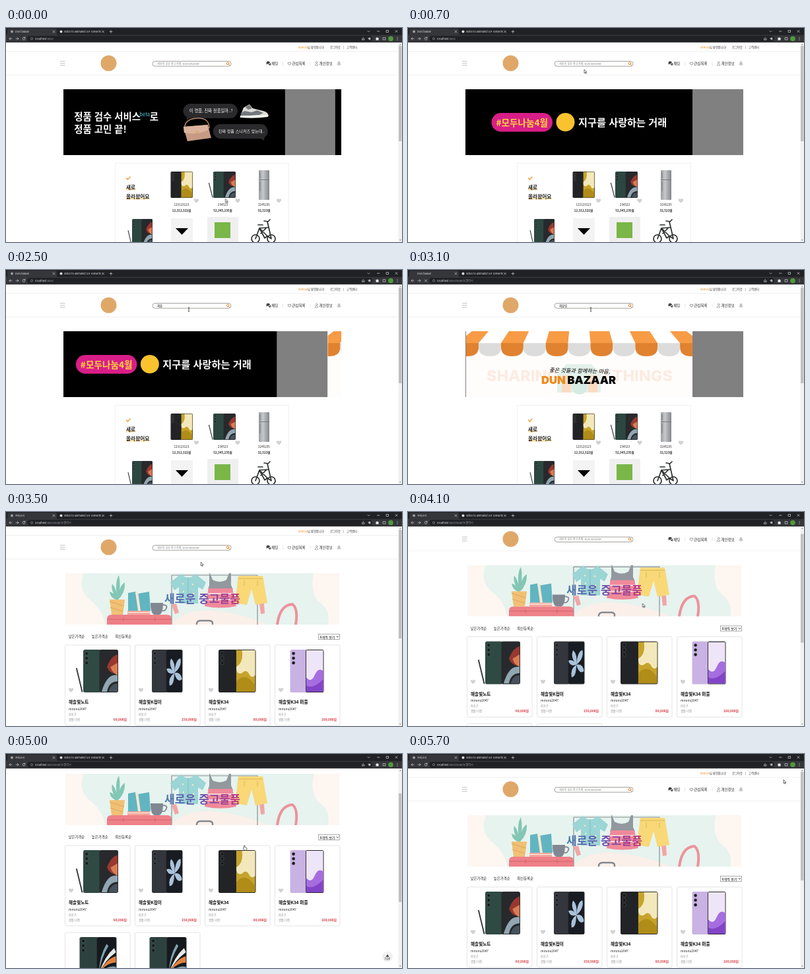
These frames come from a looping animation (600x325 px, 5.8 s). An HTML page:

```html
<!DOCTYPE html>
<html lang="ko">
<head>
<meta charset="utf-8">
<title>Market demo</title>
<style>
  html, body { margin: 0; width: 100%; height: 100%; overflow: hidden; background: #fff; }
  svg { display: block; font-family: "Noto Sans CJK KR", "Noto Sans CJK", sans-serif; }
  .b { font-weight: 700; }
  .m { text-anchor: middle; }
  .e { text-anchor: end; }
  .line { fill: none; stroke-linecap: round; stroke-linejoin: round; }
  .track, .scroll, #cursor { animation: 5800ms linear infinite paused; }
  .track { animation-name: slide; animation-delay: -17ms; }
  .scroll { --k: -1px; animation-name: scroll; }
  .thumb { --k: .52px; }
  #cursor { animation-name: move; }
  @keyframes slide {
    0% { transform: translateX(0); animation-timing-function: ease; }
    8.62%, 42.83% { transform: translateX(-420px); animation-timing-function: ease; }
    51.45%, 100% { transform: translateX(-840px); }
  }
  @keyframes scroll {
    0%, 68.62% { transform: translateY(0); animation-timing-function: ease-in-out; }
    73.28%, 76.72% { transform: translateY(calc(31 * var(--k))); animation-timing-function: ease-in-out; }
    80.17%, 87.93% { transform: translateY(calc(63 * var(--k))); animation-timing-function: ease-in-out; }
    94.83%, 100% { transform: translateY(0); }
  }
  @keyframes move {
    0% { transform: translate(332.5px, 259.5px); animation-timing-function: ease-in-out; }
    10.34%, 12.07% { transform: translate(267px, 63px); }
    15.52% { transform: translate(273px, 58px); }
    18.97%, 56.03% { transform: translate(277px, 57px); animation-timing-function: ease-in-out; }
    68.97%, 75.86% { transform: translate(355.5px, 139px); }
    81%, 88.79% { transform: translate(361px, 139px); animation-timing-function: ease-in-out; }
    98%, 100% { transform: translate(569px, 39px); }
  }
</style>
</head>
<body>
<svg width="600" height="325">
  <defs>
    <clipPath id="view"><rect y="22" width="600" height="303"/></clipPath>
    <clipPath id="hero"><rect x="87.5" y="93" width="420" height="100"/></clipPath>
    <clipPath id="awningClip"><path d="M88 131V100L97 93H422L431 100V131Z"/></clipPath>
    <clipPath id="artClip"><rect x="90" y="93" width="415" height="78"/></clipPath>
    <linearGradient id="titleInk"><stop stop-color="#4c7fae"/><stop offset=".5" stop-color="#6d52ad"/><stop offset="1" stop-color="#c2357f"/></linearGradient>
    <linearGradient id="steel"><stop stop-color="#9b9ea1"/><stop offset=".4" stop-color="#c6c8ca"/><stop offset="1" stop-color="#85888b"/></linearGradient>
    <path id="heart" d="M0 3.6C-6-.2-3.6-4.6 0-2C3.6-4.6 6-.2 0 3.6Z"/>

    <!-- phone wallpapers -->
    <symbol id="gold" viewBox="0 0 10 20" preserveAspectRatio="none">
      <path d="M0 0H10V20H0z" fill="#c6a32a"/><path d="M3 0H10V12Q8 14 6.500 11Q5 9 3 11Q0 12 0 8Q4 6 3 0z" fill="#f3e8bb"/><path d="M0 15Q5 10 10 17V20H0z" fill="#b08c18"/>
    </symbol>
    <symbol id="vivid" viewBox="0 0 10 20" preserveAspectRatio="none">
      <path d="M0 0H10V20H0z" fill="#27292c"/><path d="M10 2V11Q6 12 4 8Q6 3 10 2z" fill="#98382f"/><path d="M10 6V12Q7 11 6 8z" fill="#d97d56"/><path d="M1 20Q4 11 10 12V15Q5 15 4 20z" fill="#91a6b1"/><path d="M5 20Q6 16 10 16V20z" fill="#46535d"/>
    </symbol>
    <symbol id="ice" viewBox="0 0 10 20" preserveAspectRatio="none">
      <path d="M0 0H10V20H0z" fill="#181c22"/><path d="M5 11Q1 7 3 4Q6 6 5 11Q6 4 9 4Q10 8 5 11Q9 10 10 14Q7 16 5 11Q5 17 2 17Q1 13 5 11Q1 12 0 9Q3 8 5 11z" fill="#a9c2da"/>
    </symbol>
    <symbol id="lilac" viewBox="0 0 10 20" preserveAspectRatio="none">
      <path d="M0 0H10V20H0z" fill="#eee5f8"/><path d="M0 13Q3 16 5 12T10 10V20H0z" fill="#a56de0"/><path d="M0 17Q4 19 10 14V20H0z" fill="#8344c8"/>
    </symbol>
    <symbol id="swirl" viewBox="0 0 10 20" preserveAspectRatio="none">
      <path d="M0 0H10V20H0z" fill="#15191d"/><path d="M1 17Q4 9 9 5L10 7Q4 11 1 17z" fill="#e6ebe9"/><path d="M1 17Q5 10 10 9V12Q5 12 1 17z" fill="#e08340"/><path d="M1 17Q6 13 10 14V16Q5 14 1 17zM1 17Q1 9 5 3L6 4Q2 10 1 17z" fill="#7da1b1"/>
    </symbol>
  </defs>

  <g clip-path="url(#view)">
    <g class="scroll">
      <!-- header -->
      <g font-size="4.35" fill="#333">
        <text x="443" y="31.4" font-size="4" fill="#f08a1d">demo42</text>
        <text x="457" y="31.4" font-size="4.2">님 환영합니다!</text>
        <text x="491" y="31.4">로그아웃</text><text x="511" y="31.2">|</text><text x="516" y="31.4">고객센터</text>
      </g>
      <path d="M0 35.5H595M0 71.5H595" stroke="#f0f0f0"/>
      <path d="M82 50.5H89.5M82 53.5H89.5M82 56.5H89.5" stroke="#aaa" stroke-width=".7"/>
      <circle cx="155.5" cy="53.5" r="12" fill="#dfa869"/>
      <rect x="222" y="50.5" width="119" height="7.6" rx="3.8" fill="#fff" stroke="#8f8983" stroke-width=".8"/>
      <g class="line" stroke="#e08a2c"><circle cx="336" cy="53.8" r="1.8"/><path d="M337.4 55.2L339 56.8"/></g>
      <text data-on="0 2100 3200 5800" x="229" y="55.9" font-size="4.1" fill="#7c8585">세상의 모든 중고거래, DUN BAZAAR</text>
      <text id="typed" data-on="2100 3200" x="229" y="56" font-size="4.3" fill="#111"></text>
      <path data-on="1300 1800" d="M228.5 51V57" stroke="#222" stroke-width=".7"/>
      <g font-size="5.5" font-weight="500" fill="#222">
        <path d="M394.5 52.5a2.6 2 0 1 1 2 2l-1.8 1zM397.5 55.2q3 0 2.8-2.5q2 2 .4 3.3l.5 1.2l-1.4-.6q-1.800 .2-2.300-1.400z" fill="#444"/>
        <text x="402.2" y="56.2">채팅</text><text x="433.3" y="56.2">관심목록</text><text x="474.5" y="56.2">개인정보</text>
        <path d="M419.5 51V57M461 51V57" stroke="#ddd" stroke-width=".7"/>
        <use href="#heart" transform="translate(429.5 54) scale(.65)" fill="none" stroke="#555"/>
        <g class="line" stroke="#666" stroke-width=".5"><circle cx="470.5" cy="52.3" r="1.4"/><path d="M468.2 56.7q0-2.2 2.3-2.2t2.3 2.2z"/></g>
        <path d="M501 56.3q1.5-1.2 1.5-3.5q.2-2 2-2.2q1.8.2 2 2.2q0 2.3 1.5 3.5zM503.4 56.8h2.2q-1.1 1.4-2.2 0z" fill="#c4c4c4"/>
      </g>

      <!-- home -->
      <g data-on="0 3200">
        <g clip-path="url(#hero)"><g class="track">
          <g>
            <rect x="87" y="93" width="344.5" height="100"/>
            <g class="b" font-size="14.4" fill="#fff">
              <text x="111.5" y="140">정품 검수 서비스</text><text x="226" y="140">로</text><text x="111.5" y="159">정품 고민 끝!</text>
            </g>
            <text x="210.5" y="134" font-size="7.6" fill="#58c5d8">beta</text>
            <path d="M287 115h61a11 11 0 0 1 0 22h-61l-5 3v-4.5a11 11 0 0 1 5-20.5z" fill="#2a2a2c"/>
            <path d="M333 146h61a11 11 0 0 1 6 20l-1 5l-5-3h-61a11 11 0 0 1 0-22z" fill="#2a2a2c"/>
            <text x="286" y="128.3" font-size="6.3" fill="#fff">이 명품, 진짜 정품일까..?</text>
            <text x="330" y="159.2" font-size="6.1" fill="#fff">진짜 정품 스니커즈 맞는데..</text>
            <path d="M279 150Q280 138 298 137T316 152" class="line" stroke="#b58466" stroke-width="1.6"/>
            <path d="M277 150l37-3l5 20l-36 5z" fill="#c79a83"/>
            <path d="M277 150l37-3l1 8q-18 8-37 4z" fill="#dbb29c"/>
            <circle cx="297" cy="158" r="2" fill="#d7b15d"/>
            <path d="M364 132l4-11l9-5l5 6l16 4q8 2 8 8l-26 2z" fill="#dedcd7"/>
            <path d="M364 129l6-3l10 2l9-3l9 4l-6 3l-28 2zM371 120l6-3l4 5l-6 2z" fill="#73787d"/>
            <path d="M363 133h15l27-1v3q-20 3-42 1z" fill="#f5f3ee"/>
            <rect x="431" y="93" width="77" height="100" fill="#808080"/>
          </g>
          <g transform="translate(420)">
            <rect x="87" y="93" width="344.5" height="100"/>
            <rect x="126.5" y="129" width="92.5" height="28.5" rx="14.2" fill="#d91e88"/>
            <text x="172.8" y="148.6" class="b m" font-size="13.6" fill="#ffd83a">#모두나눔4월</text>
            <circle cx="238.5" cy="143" r="14" fill="#f9c22e"/>
            <text x="258" y="148.8" class="b" font-size="15.2" fill="#fff">지구를 사랑하는 거래</text>
            <rect x="431" y="93" width="77" height="100" fill="#808080"/>
          </g>
          <g transform="translate(840)">
            <rect x="88" y="93" width="344" height="100" fill="#fffdfc"/>
            <g id="awning" clip-path="url(#awningClip)"></g>
            <text x="260" y="168.5" class="m" font-family="Inter, sans-serif" font-weight="800" font-size="23.5" fill="#fcebe2">SHARING GOOD THINGS</text>
            <path d="M226 157l14-14h38l14 14v29h-66z" fill="#e4f0ea"/>
            <path d="M233 160h14v26h-14zM273 160h14v26h-14z" fill="#fbdcc2"/><circle cx="260" cy="177" r="12" fill="#d6ebe4"/>
            <text x="260" y="156" class="m" font-size="8.2" font-style="italic" transform="rotate(1.5 260 153)">좋은 것들과 함께하는 마음,</text>
            <g font-family="Inter, sans-serif" font-weight="900" font-size="16.6"><text x="202" y="173" fill="#ee8a1b">DUN</text><text x="241.5" y="173">BAZAAR</text></g>
            <rect x="431" y="93" width="77" height="100" fill="#808080"/>
          </g>
        </g></g>

        <rect x="165.5" y="205.5" width="263" height="140" fill="#fff" stroke="#f1f1f1"/>
        <path d="M182.5 228l2 2.2l3.5-4.2" class="line" stroke="#ee9a28" stroke-width="1.3"/>
        <path d="M182 243.5h14v3h-14zM182 257.5h35.5v3h-35.5z" fill="#ffdfa9"/>
        <g class="b" font-size="7.7" fill="#222"><text x="182" y="244.7">새로</text><text x="182" y="258.7">올라왔어요</text></g>
        <g id="items"></g>
        <rect x="383" y="216" width="16" height="45" rx=".8" fill="url(#steel)"/><path d="M383 230.5h16M385 219v9M385 233v15" stroke="#666" stroke-width=".7"/>
        <rect x="250" y="289" width="33" height="37" fill="#f3f3f3"/><path d="M257 304h19l-9.5 10z"/>
        <rect x="305" y="287" width="47" height="40" fill="#efefef"/><rect x="316" y="295" width="24" height="24" fill="#7ab648"/>
        <g class="line" stroke="#2d302e" stroke-width="1.7">
          <circle cx="378" cy="320" r="6"/><circle cx="402" cy="320" r="6"/>
          <path d="M378 320l6-16l12 12l6 4l-6-26M384 304l13-1M382 299h7M391 293l6 1l3-3M386 312l8-8M384 304l8 15l4-3"/>
        </g>
      </g>

      <!-- category -->
      <g data-on="3200 5800">
        <g clip-path="url(#artClip)">
          <rect x="90" y="93" width="415" height="78" fill="#fdf6f1"/>
          <path d="M118 93Q108 118 128 134T150 171H488Q492 150 476 138T466 93z" fill="#e6f3ee"/>
          <path d="M250 171Q268 148 310 150T397 171" fill="#fbefe9"/>
          <!-- rack -->
          <path d="M251 171V96H381V171" class="line" stroke="#8b9094" stroke-width="1.2"/>
          <path d="M251 141l5 14l6-2l-4-14zM384 139l2 16l6-1l-1-15z" fill="#f3a5a5"/>
          <path d="M265 94Q276 105 287 94L303 107L298 118L291 114V139H262V114L255 119L249 107z" fill="#9bd5d6"/>
          <path d="M276 99V139" stroke="#7fbfc4"/>
          <g fill="#f3e9b8"><circle cx="268" cy="109" r="1.3"/><circle cx="283" cy="110" r="1.3"/><circle cx="269" cy="121" r="1.3"/><circle cx="284" cy="124" r="1.3"/><circle cx="268" cy="132" r="1.3"/></g>
          <path d="M309 93l4 10q11 6 21 0l4-10h3v18l3 7h-38l2-7V93z" fill="#93989f"/>
          <path d="M307 116h36l6 27q-24 5-48 0z" fill="#f0899a"/>
          <path d="M305 124h40M303 133h44" stroke="#f9d6d9" stroke-width="2"/>
          <path d="M352 97h37l7 41l-18 3l-6-24l-7 24l-18-3z" fill="#f8d877"/><path d="M352 101h37M361 104v8M381 104v8" stroke="#ddb655"/>
          <path d="M411 171Q415 141 434 140Q443 147 439 171" class="line" stroke="#ee929b" stroke-width="4"/>
          <path d="M289 172v-3q1-4 6-4h12q6 0 6 4v3" class="line" stroke="#85898f" stroke-width="2.5"/>
          <!-- desk -->
          <path d="M153 171v-9q0-6 7-6h84q7 0 7 6v9z" fill="#ee8088"/><path d="M153 163h98M178 160v6M226 160v6" stroke="#d5636d"/>
          <path d="M184 150h34v6h-34z" fill="#f3a79b"/><path d="M184 152.500h34" stroke="#fff2ea" stroke-width="1.200"/>
          <path d="M185 123l11-2l5 29h-16zM200 124l17-3l2 29h-16z" fill="#61b5c0"/><path d="M196 121l4 1l4 28h-4z" fill="#f6e6d3"/>
          <path d="M169 134Q158 119 161 109Q168 117 169 134Q164 107 171 96Q175 112 169 134Q171 112 180 107Q181 123 169 134Q158 131 157 121Q165 123 169 134" fill="#84c6b4"/>
          <path d="M157 133h23l-3 23h-17z" fill="#f0c174"/><path d="M157 136l22 7M158 145l19 6" stroke="#e2a35d"/>
          <path d="M219 138h19q0 18-7 18h-5q-7 0-7-18z" fill="#828892"/><path d="M238 141q7 0 5 5t-6 4" class="line" stroke="#828892" stroke-width="1.8"/>
        </g>
        <text x="240" y="138" class="b" font-size="17.1" fill="url(#titleInk)">새로운 중고물품</text>
        <g font-size="5.4" fill="#222"><text x="94.5" y="191.2">낮은가격순</text><text x="129.8" y="191.2">높은가격순</text><text x="165.3" y="191.2">최신등록순</text></g>
        <rect x="473.5" y="185.5" width="32" height="8" fill="#fff" stroke="#888" stroke-width=".7"/>
        <text x="475.5" y="191.5" font-size="5.1">8개씩 보기</text><path d="M501 188.7l1.4 1.6l1.4-1.6" class="line" stroke="#222" stroke-width=".8"/>
        <g id="cards"></g>
      </g>
    </g>

    <g data-on="4600 5400">
      <circle cx="578" cy="308" r="8" fill="#f0f0f0"/><path d="M575.5 308l2.5-3.5l2.5 3.5z" fill="#333"/>
      <text x="578" y="312.5" class="m" font-size="4.5" fill="#222">TOP</text>
    </g>
    <rect x="594.5" y="22" width="5.5" height="303" fill="#f1f1f1"/>
    <path d="M596 25.5l1.3-1.5l1.3 1.5zM596 321.5l1.3 1.5l1.3-1.5z" fill="#777"/>
    <rect data-on="0 3200" x="595" y="27" width="4.5" height="145" fill="#c1c1c1"/>
    <rect data-on="3200 5800" class="scroll thumb" x="595" y="27" width="4.5" height="165" fill="#c1c1c1"/>
  </g>

  <!-- browser -->
  <rect width="600" height="22" fill="#202124"/>
  <path d="M0 10.5q2 0 2-2V3q0-2 2-2H75q2 0 2 2v5.5q0 2 2 2H600V22H0z" fill="#35363a"/>
  <rect x="32" y="12" width="523" height="8.5" rx="4.2" fill="#202124"/>
  <g font-size="3.8" fill="#e8eaed">
    <circle data-on="0 2900 3200 5800" cx="9" cy="5.5" r="2" fill="#9aa0a6"/>
    <text data-on="0 3200" x="14" y="6.9">DUN bazaar</text><text data-on="3200 5800" x="14" y="6.9">카테고리</text>
    <circle cx="83.5" cy="5.5" r="2" fill="#ddd"/>
    <text x="88" y="6.9">Video to animated GIF converte</text>
    <circle cx="39" cy="16.2" r="1.6" fill="none" stroke="#aaa" stroke-width=".6"/>
    <text x="44" y="17.8" font-size="4.1">localhost<tspan fill="#9aa0a6">:8000<tspan data-on="2900 5800">/search/갤럭시</tspan></tspan></text>
  </g>
  <g class="line" stroke="#d0d2d5" stroke-width=".7">
    <path d="M71 4l3 3m0-3l-3 3M145.5 4l3 3m0-3l-3 3M159 3.5v4m-2-2h4M548 4.5l1.5 1.5l1.5-1.5M562.500 5h3.500M576.500 3.500h3v3h-3zM590 3.500l3 3m0-3l-3 3"/>
    <path d="M9 16.2H5m1.8-1.8L5 16.2L6.8 18M15 16.2h4m-1.8-1.8l1.8 1.8l-1.8 1.8"/>
    <path data-on="0 2900 3200 5800" d="M28.8 15a2 2 0 1 0 .2 1.8M29 13.8V15.3H27.5"/>
    <path data-on="2900 3200" d="M25.5 14.7l3 3m0-3l-3 3"/>
    <path d="M539.5 16v2h3.5v-2M541.2 16.8v-2.6M549 15.6h3.5l-2.7 2l1-3.3l1 3.3zM571.500 14.500h3.400v3.400h-3.400z"/>
    <path d="M593 14.300v.1m0 1.800v.1m0 1.800v.1" stroke-width="1"/>
  </g>
  <path d="M560.500 14.800h1.300q.7-1.500 1.400 0h1.300v3.700h-4z" fill="#e8eaed"/>
  <circle cx="583" cy="16.2" r="3.8" fill="#4f9a3c"/>

  <g id="cursor" stroke-width=".6">
    <path data-on="0 1100 3300 4700 5200 5800" d="M0 0V5.6L1.3 4.4L2.2 6.4L3.1 6L2.2 4.1H4z" fill="#fff" stroke="#111"/>
    <path data-on="1100 3300" d="M-.9 0H.9M0 0V6M-.9 6H.9" stroke="#222" stroke-width=".8"/>
    <path data-on="4700 5200" d="M-.2 0q.8-.5 1.2 .3v2.3l2.4.7q.8.3.6 1.3l-.6 2.7h-3.2l-2-3q.2-.9 1.1-.2z" fill="#fff" stroke="#111"/>
  </g>
</svg>

<script>
const LOOP = 5800, STEP = 100, TYPE_START = 2100;
const STROKES = ['ㅎ', '해', '햇', '해소', '해솔', '해솔ㅂ', '해솔비', '해솔빛'];
const byId = id => document.getElementById(id);

const heart = (x, y) => `<use href="#heart" x="${x}" y="${y}" fill="#d2d2d2"/>`;

// Back and front of a phone side by side, optionally with a pen.
function phones(x, y, w, h, back, screen, pen) {
  const bw = w * .5, fx = x + w * .46, r = w * .05;
  const lens = [.09, .2, .31].map(k =>
    `<circle cx="${x + w * .1}" cy="${y + h * k}" r="${w * .045}" fill="#15181b" stroke="#777" stroke-width=".4"/>`).join('');
  const stick = pen ? `<path d="M${x - w * .19} ${y + h * .44}L${x - w * .03} ${y + h * .98}" class="line" stroke="#333" stroke-width="${w * .035}"/>` : '';
  return `${stick}<rect x="${x}" y="${y}" width="${bw}" height="${h}" rx="${r}" fill="${back}"/>${lens}
    <rect x="${fx}" y="${y}" width="${w * .54}" height="${h}" rx="${r}" fill="#2a2a2c"/>
    <use href="#${screen}" x="${fx + w * .015}" y="${y + h * .015}" width="${w * .51}" height="${h * .97}"/>`;
}

function awning() {
  const mid = 259.6, half = 16.95, top = x => mid + (x - mid) * .9;
  let out = '';
  for (let i = -5; i <= 5; i++) {
    const l = mid + (2 * i - 1) * half, r = l + 2 * half, odd = i % 2;
    out += `<path d="M${top(l)} 93H${top(r)}L${r} 111H${l}z" fill="${odd ? '#f89b45' : '#fff'}"/>
      <path d="M${l} 111H${r}V117Q${r} 131 ${l + half} 131T${l} 117z" fill="${odd ? '#e0822f' : '#dcdcdc'}"/>`;
  }
  return out;
}

const item = (x, name, price) => `${heart(x + 22.5, 262)}
  <text x="${x}" y="270.3" class="m" font-size="4.6" fill="#222">${name}</text>
  <text x="${x}" y="279" class="m b" font-size="4.5" fill="#222">${price}원</text>`;

function card([name, price, dx, w, ...look], i) {
  const x = 89.5 + i % 4 * 106, y = 202 + Math.floor(i / 4) * 132;
  return `<rect x="${x}" y="${y}" width="98.5" height="122" rx="2" fill="#fff" stroke="#ddd" stroke-width=".8"/>
    ${phones(x + dx, y + 7, w, 65, ...look)}${heart(x + 9, y + 68)}
    <text x="${x + 5.5}" y="${y + 89.2}" class="b" font-size="6.6" fill="#111">${name}</text>
    <text x="${x + 5.5}" y="${y + 99}" font-size="4.8" fill="#222">mirunu2047</text>
    <g font-size="4.2" fill="#888"><text x="${x + 5.5}" y="${y + 106.5}">마포구</text><text x="${x + 5.5}" y="${y + 114.5}">생활/가전</text></g>
    <text x="${x + 93.5}" y="${y + 114.8}" class="b e" font-size="4.8" fill="#d8303a">${price}원</text>`;
}

byId('awning').innerHTML = awning();
byId('items').innerHTML =
  phones(249.5, 218, 33.5, 40, '#222326', 'gold') +
  phones(314, 218, 34, 40, '#2c4740', 'vivid', true) +
  phones(191, 290, 31, 40, '#2c4740', 'vivid', true) +
  item(266, '123123123', '12,312,322') + item(328.5, '234523', '52,345,235') + item(391, '3245235', '32,523');
byId('cards').innerHTML = [
  ['해솔빛노트', '60,000', 27.5, 53, '#2f4a43', 'vivid', true],
  ['해솔빛K접이', '150,000', 25.5, 46.5, '#33363c', 'ice'],
  ['해솔빛K34', '80,000', 20.5, 56.5, '#222326', 'gold'],
  ['해솔빛K34 퍼플', '100,000', 23, 51, '#c9b2e4', 'lilac'],
  ['해솔빛폴더', '90,000', 22, 56, '#2d423f', 'swirl'],
  ['해솔빛폴더', '90,000', 22, 56, '#2d423f', 'swirl']
].map(card).join('');

// data-on lists alternating show and hide times.
const timed = [...document.querySelectorAll('[data-on]')]
  .map(el => [el, el.dataset.on.split(' ').map(Number)]);

function draw() {
  const t = Math.floor(performance.now() % LOOP / STEP) * STEP;
  for (const [el, edges] of timed)
    el.style.display = edges.filter(e => t >= e).length % 2 ? '' : 'none';
  const n = Math.min((t - TYPE_START) / STEP, STROKES.length - 1);
  byId('typed').textContent = STROKES[n] || '';
  for (const a of document.getAnimations()) a.currentTime = t;
  requestAnimationFrame(draw);
}
draw();
</script>
</body>
</html>
```
